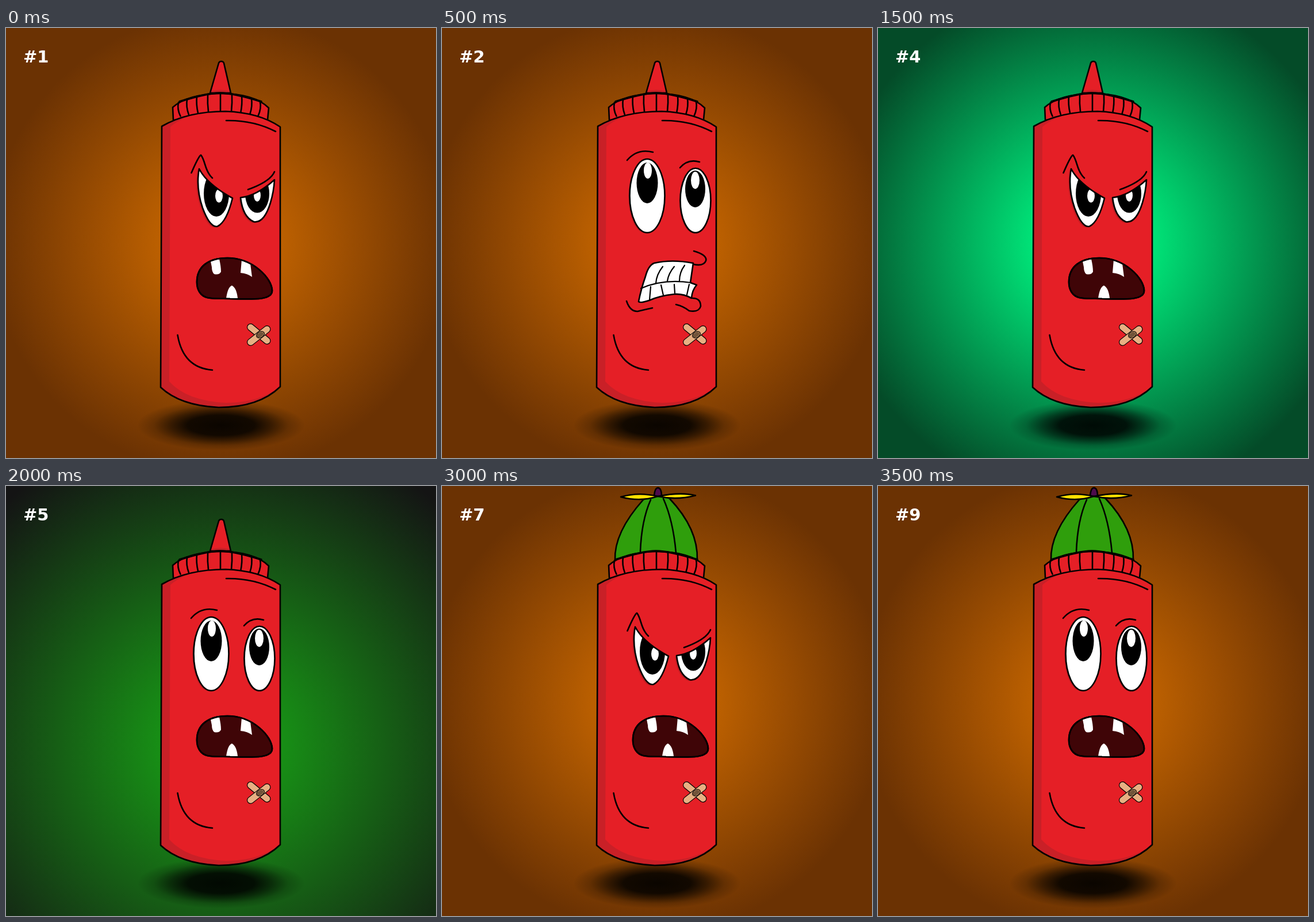
Write an HTML page that moves like this. It is 748 by 748 pixels and loops after 4 s.

```html
<!DOCTYPE html>
<html lang="en">
<head>
<meta charset="utf-8">
<style>
  html, body { margin: 0; width: 100%; height: 100%; overflow: hidden; }
  svg { display: block; width: 748px; height: 748px; }
  .line { fill: none; stroke: #000; stroke-width: 2.6; stroke-linecap: round; stroke-linejoin: round; }
  .ink { stroke: #000; stroke-width: 2.6; stroke-linejoin: round; }
  text { font: bold 29px "DejaVu Sans", sans-serif; fill: #fff; }
</style>
</head>
<body>
<svg viewBox="0 0 748 748">
  <defs>
    <radialGradient id="orange" gradientUnits="userSpaceOnUse" cx="374" cy="374" r="400">
      <stop offset="0" stop-color="#d87000"/><stop offset="1" stop-color="#6b3203"/>
    </radialGradient>
    <radialGradient id="green" gradientUnits="userSpaceOnUse" cx="374" cy="450" r="565">
      <stop offset="0" stop-color="#18aa16"/><stop offset="1" stop-color="#141414"/>
    </radialGradient>
    <radialGradient id="mint" gradientUnits="userSpaceOnUse" cx="374" cy="374" r="455">
      <stop offset="0" stop-color="#00f583"/><stop offset=".22" stop-color="#00e478"/><stop offset="1" stop-color="#044b28"/>
    </radialGradient>
    <radialGradient id="shade">
      <stop offset="0" stop-opacity=".92"/><stop offset=".4" stop-opacity=".86"/>
      <stop offset=".6" stop-opacity=".56"/><stop offset=".8" stop-opacity=".2"/><stop offset="1" stop-opacity="0"/>
    </radialGradient>
    <path id="eyeL" d="M336 245Q350 272 394 296Q384 337 368 345Q355 348 342 313Q330 278 336 245Z"/>
    <path id="eyeR" d="M467 264Q436 292 408 295Q412 329 431 337Q449 340 460 304Q466 284 467 264Z"/>
    <clipPath id="clipL"><use href="#eyeL"/></clipPath>
    <clipPath id="clipR"><use href="#eyeR"/></clipPath>
  </defs>

  <rect id="back" width="748" height="748"/>
  <ellipse cx="374" cy="691" rx="146" ry="44" fill="url(#shade)"/>
  <text id="label" x="30" y="60"></text>

  <g data-part="nozzle">
    <path d="M355 113L370 61Q371 58 374.500 58Q378 58 379 61L391 113Z" fill="#e51f26"/>
    <path d="M356 110Q373 105 390 110L391 113H355Z" fill="#c92027"/>
    <path class="line" d="M355 113L370 61Q371 58 374.500 58Q378 58 379 61L391 113Z"/>
  </g>
  <g data-part="hat" class="ink">
    <path d="M301 129Q299 81 350 24Q375 8 396 22Q446 75 444 129Q372 106 301 129Z" fill="#2f9e0c"/>
    <path class="line" d="M363 24Q347 60 345 114M385 22Q402 60 407 116"/>
    <path d="M369 18Q370 3 376 3Q382 4 382 18Z" fill="#4d0a4d"/>
    <path d="M311 19Q342 10 375 18Q345 28 311 19ZM376 18Q415 10 441 16.500Q408 25 376 18Z" fill="#ffe100"/>
  </g>

  <path class="ink" d="M291 160L290 138Q316 115 372 114Q432 114 457 139L455 160Z" fill="#e51f26"/>
  <path class="line" d="M302 128Q350 113 372 113Q396 113 444 128" style="stroke-width:3.5"/>
  <path id="ribs" class="line"/>

  <path d="M271 171Q316 145 382 145Q440 147 477 172V624Q440 660 370 660Q303 657 269 625Z" fill="#c92027"/>
  <path d="M286 172Q305 155 340 148Q370 144 400 146Q445 150 477 172V624Q440 652 383 652Q315 649 284 615Z" fill="#e51f26"/>
  <path class="line" d="M271 171Q316 145 382 145Q440 147 477 172V624Q440 660 370 660Q303 657 269 625Z"/>
  <path class="line" d="M383 161Q430 160 469 180M298.500 534Q308 591 359 595"/>

  <g data-part="angry">
    <g fill="#c41c22" transform="translate(-3 2)"><use href="#eyeL"/><use href="#eyeR"/></g>
    <g fill="#fff"><use href="#eyeL"/><use href="#eyeR"/></g>
    <g clip-path="url(#clipL)">
      <ellipse cx="366" cy="288" rx="22" ry="40"/>
      <ellipse cx="370.500" cy="292" rx="6.500" ry="11.500" fill="#fff"/>
    </g>
    <g clip-path="url(#clipR)">
      <ellipse cx="437" cy="288" rx="21" ry="33.500"/>
      <ellipse cx="437" cy="291" rx="6" ry="11" fill="#fff"/>
    </g>
    <g class="line"><use href="#eyeL"/><use href="#eyeR"/></g>
    <path class="line" d="M322.500 252Q335 223 339 221Q342 224 346 237Q351 254 359 261M421 281Q460 267 467 250"/>
  </g>

  <g data-part="wide">
    <g fill="#c41c22"><ellipse cx="354" cy="294" rx="30" ry="63"/><ellipse cx="438.500" cy="302" rx="26" ry="55"/></g>
    <g class="ink" fill="#fff"><ellipse cx="357" cy="292" rx="30.500" ry="64"/><ellipse cx="441" cy="300" rx="26.500" ry="56"/></g>
    <ellipse cx="357" cy="269.500" rx="18.500" ry="35.500"/><ellipse cx="440.500" cy="280" rx="17.500" ry="32"/>
    <g fill="#fff"><ellipse cx="358" cy="248" rx="7" ry="14"/><ellipse cx="440.500" cy="265" rx="7.500" ry="15"/></g>
    <path class="line" d="M322 230Q340 209 367 216M414 243Q428 227 448 233"/>
  </g>

  <g data-part="open">
    <path id="maw" d="M332 442C332 415 352 400 385 400C430 400 463 436 463 457C463 474 430 472 390 471C375 470 362 472 350 469C338 466 332 455 332 442Z" fill="#3f0507"/>
    <path d="M356 406L371 402Q374 415 374 424Q371 430 362 428Q358 424 358 416ZM410 403L425 410L428 433Q420 427 408 426ZM383 470Q386 450 393 448Q401 452 403 470Z" fill="#fff"/>
    <use href="#maw" class="line" style="fill-opacity:0"/>
    <path class="line" d="M332 442C332 415 352 400 385 400C430 400 463 436 463 457C463 474 430 472 390 471C375 470 362 472 350 469C338 466 332 455 332 442Z"/>
  </g>

  <g data-part="teeth">
    <path class="ink" d="M342 476Q346 455 354 432Q359 413 369 409Q400 402 437 409L432 443L443 447Q435 456 434 470Q420 462 404 463Q377 466 360 474Q345 479 342 476Z" fill="#fff"/>
    <path class="line" d="M346 453Q385 436 433 443M384 415Q373 429 372 444M404 415Q394 427 392 440M422 413Q413 425 413 440M363 450L361 473M381 447L385 465M404 446L405 461M430 446L426 464" style="stroke-width:2.2"/>
    <path class="line" d="M438 388Q462 395 459 405Q455 415 437 411M436 470Q450 470 450 484Q447 495 430 492Q420 484 407 481M321 475Q327 493 340 493Q352 490 366 487"/>
  </g>

  <g fill="none" stroke-linecap="round">
    <path d="M425.500 520.500L454 544" stroke="#000" stroke-width="13"/>
    <path d="M425.500 520.500L454 544" stroke="#e8b083" stroke-width="10.600"/>
    <path d="M425.500 546.500L454 524" stroke="#000" stroke-width="13"/>
    <path d="M425.500 546.500L454 524" stroke="#e8b083" stroke-width="10.600"/>
    <g transform="translate(442.500 533.500) rotate(-30)" stroke="#000">
      <ellipse rx="7.500" ry="5" fill="#9b7450"/>
      <path d="M-5 -2H5M-6 0H6M-5 2H5" stroke-width="1" stroke-dasharray=".5 2"/>
    </g>
  </g>

  <path data-part="halo" class="ink" fill="#ffeb00" fill-rule="evenodd" style="stroke-width:3.2"
    d="M296 53.500a79 24 0 0 1 158 0a79 24 0 0 1 -158 0ZM320 53.500a54 11.500 0 0 0 108 0a54 11.500 0 0 0 -108 0Z"/>
</svg>
<script>
  const $ = id => document.getElementById(id);
  const parts = document.querySelectorAll("[data-part]");
  const scenes = [
    ["#1", "orange", "nozzle angry open"],
    ["#2", "orange", "nozzle wide teeth"],
    ["#3", "green", "nozzle halo angry open"],
    ["#4", "mint", "nozzle angry open"],
    ["#5", "green", "nozzle wide open"],
    ["#6", "orange", "hat angry teeth"],
    ["#7", "orange", "hat angry open"],
    ["#9", "orange", "hat wide open"]
  ];

  // Ribs follow the curved rim and lean outward toward the sides.
  $("ribs").setAttribute("d", [300, 315, 332, 351, 373, 393, 410, 427, 442].map(x => {
    const u = (x - 373) / 83, top = 114 + 20 * u * u, bottom = 145 + 11 * u * u;
    return `M${x} ${top}Q${x + 3 * u} ${(top + bottom) / 2} ${x - 4 * u} ${bottom}`;
  }).join(""));

  let shown = -1;
  function frame(now) {
    const index = Math.floor(now % 4000 / 500);
    if (index !== shown) {
      shown = index;
      const [label, back, names] = scenes[index];
      const visible = names.split(" ");
      $("label").textContent = label;
      $("back").setAttribute("fill", `url(#${back})`);
      for (const part of parts) part.style.display = visible.includes(part.dataset.part) ? "" : "none";
    }
    requestAnimationFrame(frame);
  }
  frame(performance.now());
</script>
</body>
</html>
```
